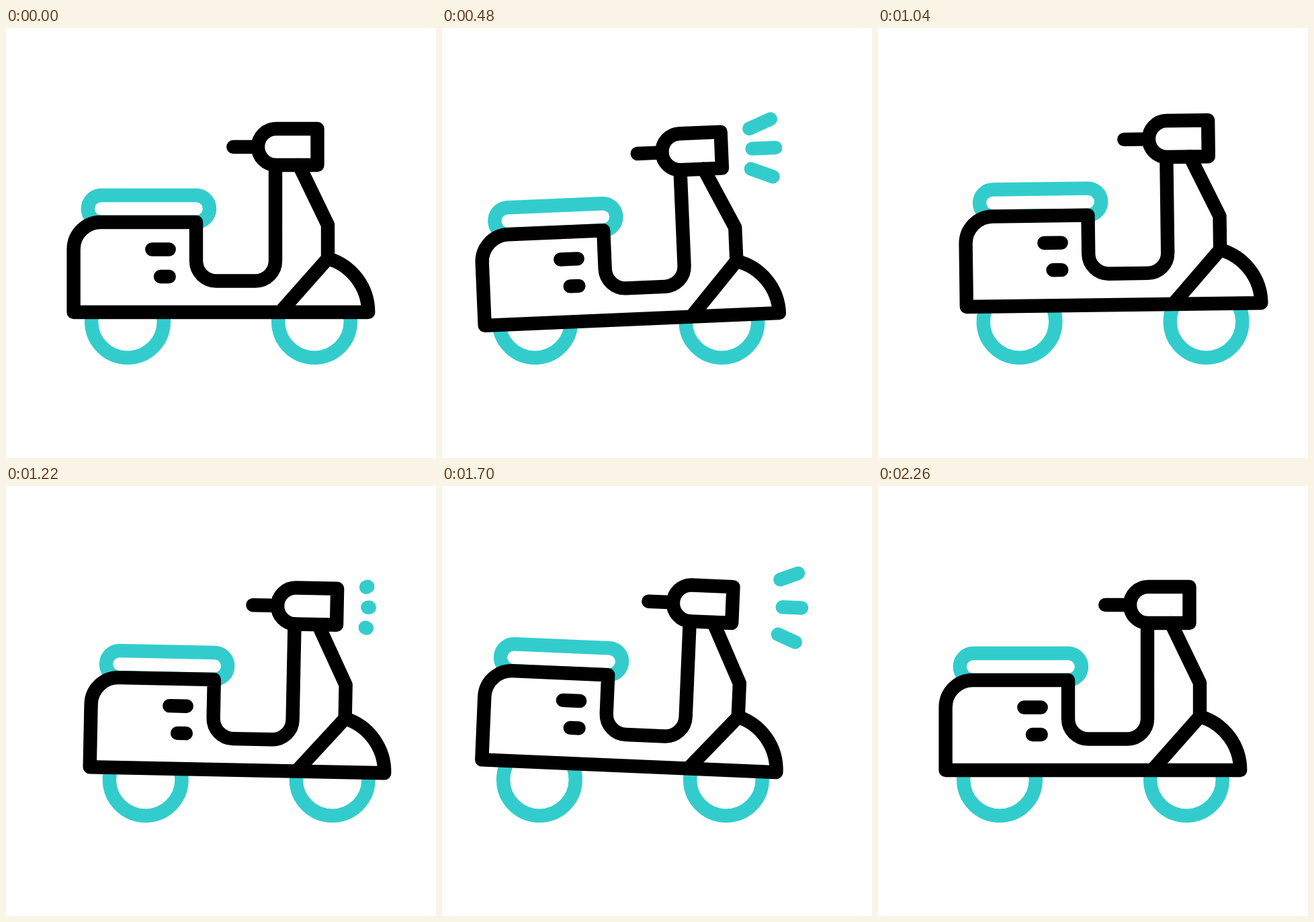
These frames come from a looping animation (640x640 px, 2.4 s). An HTML page with a canvas:

```html
<!DOCTYPE html>
<html lang="en">
<head>
<meta charset="utf-8">
<title>Scooter</title>
<style>
  html, body { margin: 0; width: 100%; height: 100%; overflow: hidden; background: #fff; }
  canvas { display: block; width: 100vmin; height: 100vmin; }
</style>
</head>
<body>
<canvas id="stage" width="640" height="640"></canvas>
<script>
const ctx = document.getElementById('stage').getContext('2d');
const LOOP = 2400, STEP = 20;
const INK = '#000', TEAL = '#33cccc';
const PIVOT = { x: 320, y: 295 };

const RAD = Math.PI / 180;
const ease = p => (1 - Math.cos(Math.PI * Math.min(1, Math.max(0, p)))) / 2;

// Swings from rest through each [time, value] turning point with the same easing.
const swing = (...turns) => t => {
  let value = 0, from = 0;
  for (const [time, target] of turns) {
    value += (target - value) * ease((t - from) / (time - from));
    if (t < time) break;
    from = time;
  }
  return value;
};

const shift = swing([565, -45], [1120, 33.5], [1620, -38], [2170, 0]);
const bounce = swing([430, 11.1], [970, -12.1], [1410, 7.5], [1860, -11.5], [2260, 0]);
const tilt = swing([680, -3.05], [1520, 2.85], [2260, 0]);

const seat = new Path2D();
seat.roundRect(121.8, 249, 181.2, 40, 20);

// One outline serves as the white filling and, with the fender edge, as the line work.
const body = new Path2D(
  'M401 204V346.5A30 30 0 0 1 371 376.5H313A30 30 0 0 1 283 346.5V289' +
  'H141A40.4 40.4 0 0 0 100.6 329.4V423H539.2A83.3 83.3 0 0 0 479 343V293L436 204');
const fenderEdge = new Path2D('M479 343L409 422');
const head = new Path2D('M463.5 150V204H402A27 27 0 0 1 402 150Z');
const details = new Path2D('M338.3 177H375M217.3 329.5H242.7M230 370H242.7');

function drawWheel(x) {
  ctx.beginPath();
  ctx.arc(x, 437, 53.8, 0, Math.PI * 2);
  ctx.stroke();
}

// Three rays fan out from the lamp: the tip runs ahead, the tail follows.
function drawRays(t) {
  const tip = ease(t / 435), tail = ease((t - 320) / 435);
  if (tip <= tail) return;
  for (const side of [-1, 0, 1]) {
    const angle = side * 22 * RAD;
    ctx.save();
    ctx.translate(509.3 - 3 * Math.abs(side), 177 + 30 * side);
    ctx.rotate(angle);
    ctx.beginPath();
    ctx.moveTo(57 * tail, 0);
    ctx.lineTo(57 * tip, 0);
    ctx.stroke();
    ctx.restore();
  }
}

function draw(t) {
  const dx = shift(t);
  ctx.fillStyle = '#fff';
  ctx.fillRect(0, 0, 640, 640);
  ctx.lineWidth = 20.4;
  ctx.lineCap = ctx.lineJoin = 'round';

  ctx.strokeStyle = TEAL;
  drawWheel(181 + dx);
  drawWheel(459 + dx);

  ctx.save();
  ctx.translate(PIVOT.x + dx, PIVOT.y + bounce(t));
  ctx.rotate(tilt(t) * RAD);
  ctx.translate(-PIVOT.x, -PIVOT.y);
  ctx.stroke(seat);
  drawRays(t - 232);
  drawRays(t - 1162);
  ctx.fill(body);
  ctx.strokeStyle = INK;
  for (const part of [body, fenderEdge, head, details]) ctx.stroke(part);
  ctx.restore();
}

const start = performance.now();
function tick() {
  const t = (performance.now() - start) % LOOP;
  draw(Math.floor(t / STEP) * STEP);
  requestAnimationFrame(tick);
}
tick();
</script>
</body>
</html>
```
